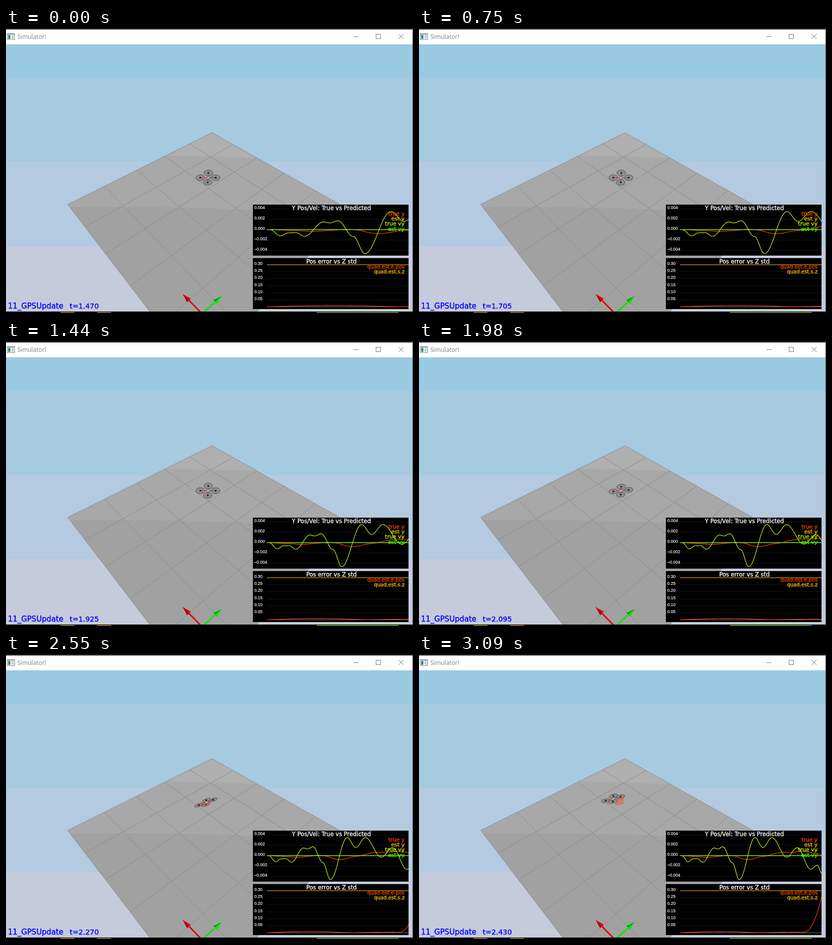
An HTML page with a canvas for the animation above (3.19 s loop, 821 px wide and 576 px high).

```html
<!DOCTYPE html>
<html lang="en">
<head>
<meta charset="utf-8">
<title>Simulator!</title>
<style>
html, body { margin: 0; width: 100%; height: 100%; overflow: hidden; }
canvas { display: block; }
</style>
</head>
<body>
<canvas id="stage" width="821" height="576"></canvas>
<script>
const ctx = document.getElementById('stage').getContext('2d');
const LOOP = 3190, REFRESH = 130, DT = .005;
const SANS = '"DejaVu Sans", sans-serif', NARROW = '"Liberation Sans", sans-serif';
const RED = '#ff4000', AMBER = '#ffbf00', LIME = '#bfff00', GREEN = '#40ff00';

// [ms, simulated seconds]
const CLOCK = [[0, 1.47], [240, 1.54], [750, 1.705], [1440, 1.925],
  [1980, 2.095], [2550, 2.27], [3090, 2.43]];
// [seconds, centre x, centre y, rotor squash, tilt]
const POSES = [[1.95, 407, 302, .66, 0], [2.095, 407, 302, .56, -.1],
  [2.27, 403, 299.5, .31, -.35], [2.43, 391, 292, .4, -.25]];
// Turning points of the velocity: [seconds, pixels above zero]
const TURNS = [[.03, 0], [.14, -12.5], [.22, -6.5], [.3, -6], [.39, -13.3], [.585, 15.5],
  [.65, 13.5], [.735, 18], [.895, -14], [1.015, -48.5], [1.285, 36.5], [1.42, 16.5],
  [1.575, 36.5], [1.83, -3], [2.01, 16], [2.24, -27.5], [2.35, -19.5], [2.44, -37]];

const linear = p => p;
const smooth = p => (1 - Math.cos(Math.PI * p)) / 2;

function between(keys, t, ease = linear) {
  const n = keys.findIndex(k => k[0] >= t);
  if (n < 1) return keys[n < 0 ? keys.length - 1 : 0];
  const a = keys[n - 1], b = keys[n], span = b[0] - a[0];
  const p = ease((t - a[0]) / span, span);
  return a.map((v, i) => v + (b[i] - v) * p);
}

// Simulated time advances in refreshes of about REFRESH ms
function simTime(ms) {
  const hold = (p, span) => {
    const ticks = Math.round(span / REFRESH);
    return Math.floor(p * ticks) / ticks;
  };
  return Math.round(between(CLOCK, ms, hold)[1] / DT) * DT;
}

const velocity = t => between(TURNS, t, smooth)[1];
const error = t => 2.6 * Math.abs(Math.sin(2.29 * t)) / Math.max(1, t)
  + 900 * Math.max(0, t - 2.11) ** 2.2;

function box(color, x, y, w, h) {
  ctx.fillStyle = color;
  ctx.fillRect(x, y, w, h);
}

function path(points, stroke, width = 1, fill) {
  ctx.beginPath();
  points.forEach(p => ctx.lineTo(p[0], p[1]));
  if (fill) { ctx.closePath(); ctx.fillStyle = fill; ctx.fill(); }
  if (stroke) { ctx.strokeStyle = stroke; ctx.lineWidth = width; ctx.stroke(); }
}

function text(str, x, y, size, color, align = 'left', family = SANS, weight = .35) {
  ctx.font = size + 'px ' + family;
  ctx.textAlign = align;
  ctx.fillStyle = ctx.strokeStyle = color;
  ctx.lineWidth = weight;
  ctx.fillText(str, x, y);
  if (weight) ctx.strokeText(str, x, y);
}

// Draws with whole coordinates on pixel centres, inside a clip box
function inside(x, y, w, h, paint) {
  ctx.save();
  ctx.beginPath();
  ctx.rect(x, y, w, h);
  ctx.clip();
  ctx.translate(.5, .5);
  paint();
  ctx.restore();
}

function drawWindow() {
  box('#231e28', 0, 0, 821, 576);
  box('#0c0c0c', 0, 573, 821, 3);
  box('#fff', 0, 3, 820, 30);
  box('#7d858a', 2, 11, 16, 13);
  box('#fff', 3, 13, 14, 10);
  box('#3f8f86', 4, 14, 5, 8);
  box('#c9d0d4', 11, 14, 5, 8);
  text('Simulator!', 23, 22, 12, '#858585', 'left', '"Noto Sans", sans-serif', 0);
  path([[701, 17.5], [711, 17.5]], '#777');
  ctx.strokeRect(746.5, 12.5, 9, 9);
  path([[792, 12], [802, 22]], '#777');
  path([[802, 12], [792, 22]], '#777');
  box('#9acae2', 0, 33, 820, 68);
  box('#a6cae0', 0, 101, 820, 169);
  box('#b3cae0', 0, 270, 820, 171);
  box('#c5cbdb', 0, 441, 820, 132);
  box('#8a7020', 110, 574, 28, 2);
  box('#8a7020', 184, 574, 28, 2);
  box('#5d8a22', 627, 574, 165, 2);
}

// Floor grid: homogeneous point, two vanishing points on the horizon
function floor(i, j) {
  const u = .0535 * i, v = .0569 * j, w = 1 - u - v;
  return [(415 - 1212 * u + 290 * v) / w, (211 + 186 * (u + v)) / w];
}

// Everything above a gently arched line
function shade(color, y) {
  ctx.beginPath();
  ctx.moveTo(100, y);
  ctx.quadraticCurveTo(400, y - 4, 700, y + 16);
  ctx.lineTo(700, 200);
  ctx.lineTo(100, 200);
  ctx.fillStyle = color;
  ctx.fill();
}

function arrow(tipX, tipY, tailX, tailY, light, dark) {
  const len = Math.hypot(tailX - tipX, tailY - tipY);
  const dx = (tailX - tipX) / len, dy = (tailY - tipY) / len;
  const at = (along, side) => [tipX + dx * along - dy * side, tipY + dy * along + dx * side];
  path([at(14, 0), at(len, 0)], light, 3);
  path([at(0, 0), at(18, 5), at(18, -5)], null, 1, light);
  path([at(0, 0), at(18, 5), at(18, 1)], null, 1, dark);
}

function drawFloor() {
  ctx.save();
  path([floor(0, 0), floor(5, 0), floor(5, 5), floor(0, 5)], null, 1, '#a1a1a1');
  ctx.clip();
  shade('#a8a8a8', 362);
  shade('#afafaf', 257);
  ctx.restore();
  for (let k = 0; k < 6; k++) {
    path([floor(k, 0), floor(k, 5)], '#8b8b8b');
    path([floor(0, k), floor(5, k)], '#8b8b8b');
  }
  arrow(356, 537, 394, 576, '#e00000', '#9c0000');
  arrow(435, 541, 396, 576, '#00e600', '#00a000');
}

function drawDrone(sim) {
  const [, cx, cy, squash, tilt] = between(POSES, sim);
  const up = [.5, -14.4 * squash], right = [15.5 * Math.cos(tilt), 15.5 * Math.sin(tilt)];
  const hubs = [up, right.map(v => -v), right, up.map(v => -v)];
  hubs.forEach(([dx, dy]) => {
    ctx.beginPath();
    ctx.ellipse(cx + dx, cy + dy, 9, 9 * squash, tilt, 0, 7);
    ctx.fillStyle = '#8e8e8e';
    ctx.fill();
    ctx.strokeStyle = '#505050';
    ctx.lineWidth = 1;
    ctx.stroke();
  });
  hubs.forEach(([dx, dy], i) => {
    path([[cx, cy], [cx + dx, cy + dy]], i < 2 ? '#ee4418' : '#5a5f9a', 1.3);
    box('#15152e', cx + dx - 1.5, cy + dy - 1.5, 3, 3);
  });
  path([[cx - 4, cy + 1], [cx, cy - 3], [cx + 5, cy - 1], [cx, cy + 4]], '#333a55', 1, '#c98f88');
  path([[cx - 3, cy + 2], [cx + 4, cy - 2]], '#f0e8e8');
  // Estimated pose left behind once the craft drifts away
  const lines = Math.round((sim - 2.2) / .23 * 5);
  for (let i = 0; i < lines; i++) {
    const y = 305 - i * 2.8;
    path([[395 + i, y], [404, y - 1], [413 - i * .4, y - 5]], '#ff4a14', 1.2);
  }
}

// The time axis always ends at the current second
function curve(value, zero, sim, color) {
  const points = [];
  for (let t = 0; t <= sim + DT; t += DT) points.push([526 + t / sim * 286, zero - value(t)]);
  path(points, color, 1.2);
}

function panel(y, title, first, last, step, digits, tickY, gap, drawCurves) {
  box('#000', 498, y, 314, 103);
  inside(498, y, 314, 103, () => {
    for (let i = 0; first - i * step > last - step / 2; i++) {
      const ty = tickY + i * gap, value = first - i * step;
      const label = Math.abs(value).toFixed(digits);
      box('#151515', 526, Math.round(ty + 2) - .5, 286, 1);
      text((value < -step / 2 ? '–' : '') + label, 500.5, ty + 2.5, 8.5, '#fff', 'left', NARROW, .2);
    }
    drawCurves();
    text(title, 656, y + 10.3, 11.65, '#fff', 'center');
  });
}

function legend(rows, y, size) {
  rows.forEach(([label, color], i) => text(label, 804, y + i * 10.4, size, color, 'right'));
}

function drawPlots(sim) {
  let travelled = 0;
  const position = t => travelled += velocity(t) * DT;
  panel(357, 'Y Pos/Vel: True vs Predicted', .004, -.004, .002, 3, 363, 21.1, () => {
    curve(position, 407, sim, RED);
    curve(velocity, 407, sim, LIME);
    path([[526, 407], [812, 407]], '#86f01c', 1.4);
  });
  legend([['true y', RED], ['est y', AMBER], ['true vy', LIME], ['est vy', GREEN]], 378.5, 11.1);
  panel(465, 'Pos error vs Z std', .3, .05, .05, 2, 476, 14.2, () => {
    path([[526, 563], [812, 563]], '#77716c');
    path([[526, 478], [812, 478]], AMBER, 1.2);
    curve(error, 563, sim, RED);
  });
  legend([['quad.est.e.pos', RED], ['quad.est.s.z', AMBER]], 486, 10.2);
}

function draw() {
  const sim = simTime(performance.now() % LOOP);
  drawWindow();
  inside(0, 33, 820, 540, () => {
    drawFloor();
    drawDrone(sim);
  });
  drawPlots(sim);
  text('11_GPSUpdate', 4, 567, 15.1, '#0000ff');
  text('t=' + sim.toFixed(3), 128.5, 567, 14.4, '#0000ff');
  box('#444', 820, 0, 1, 576);
  requestAnimationFrame(draw);
}
draw();
</script>
</body>
</html>
```
